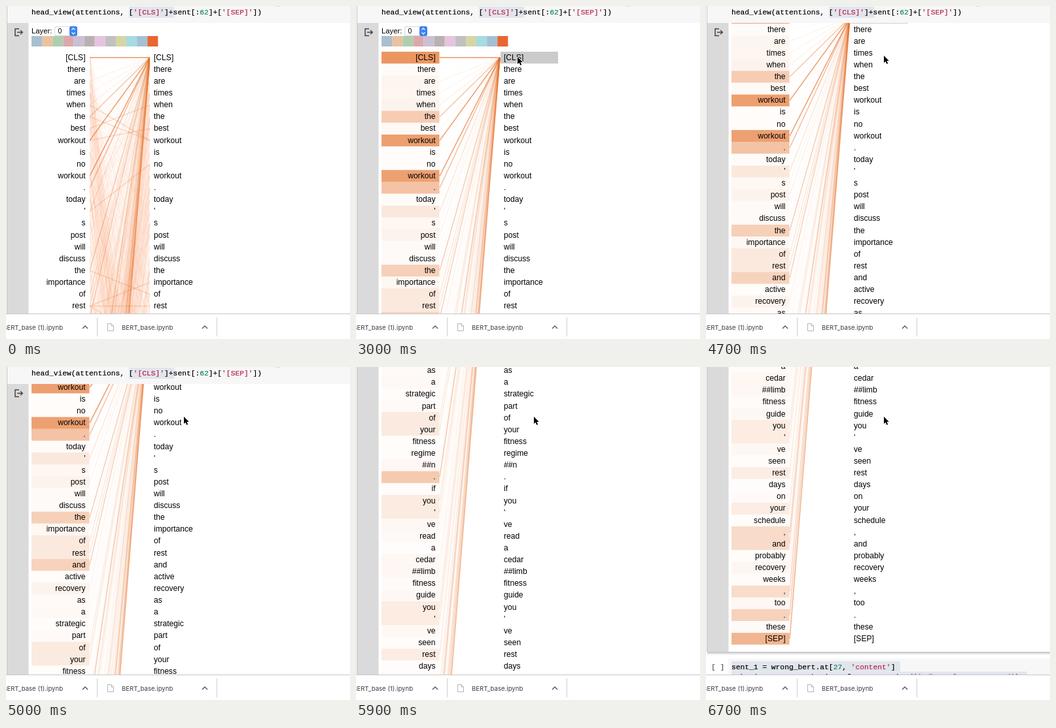
Write an HTML page with a canvas that moves like this. It is 526x510 px and loops after 6800 ms.

```html
<!DOCTYPE html>
<html lang="en">
<head>
<meta charset="utf-8">
<title>Attention head view</title>
<style>
  html, body { margin: 0; width: 100%; height: 100%; overflow: hidden; background: #fff; }
  canvas { display: block; width: 526px; height: 510px; }
</style>
</head>
<body>
<canvas id="stage" width="526" height="510"></canvas>
<script>
const ctx = document.getElementById('stage').getContext('2d');
const LOOP = 6800;
const SANS = '"Liberation Sans", Arial, sans-serif';
const MONO = '11.28px "Liberation Mono", monospace';
const UI = '9.6px Inter, sans-serif';
const CHAR = 6.77;           // width of one code character
const ROW = 18.12, TOP = 70; // token rows
const LEFT = 128, RIGHT = 220;
const PANE_TOP = 26, PANE_BOTTOM = 830, PANE_SCROLL = 411;
const VIEW_BOTTOM = 471;
const RED = '#ba2145', GREEN = '#098658', INK = '#000', ICON = '#444';

const tokens = ("[CLS] there are times when the best workout is no workout . today ' s post will " +
  "discuss the importance of rest and active recovery as a strategic part of your fitness " +
  "regime ##n . if you ' ve read a cedar ##limb fitness guide you ' ve seen rest days on " +
  "your schedule , and probably recovery weeks , too . these [SEP]").split(' ');

const swatches = ['#a9bfcf', '#eac2a0', '#aecfae', '#dba9ab', '#cbbfd5', '#b9b1b1',
  '#e6c3de', '#c1c1c1', '#d5d6a5', '#a5dbe2', '#a5c0d4', '#e8662f'];

// words that attend to [CLS] more than the rest
const salience = { '[CLS]': 0.73, '[SEP]': 0.73, workout: 0.69, '.': 0.44, the: 0.36,
  and: 0.34, ',': 0.34, of: 0.17, your: 0.17, you: 0.17, rest: 0.17, "'": 0.17 };

function noise(i, j) {
  const s = Math.sin(i * 127.1 + j * 311.7) * 43758.5453;
  return s - Math.floor(s);
}

// attention that token i pays to token j
function weight(i, j) {
  const n = noise(i, j);
  if (j === 0) return (salience[tokens[i]] ?? 0.02 + 0.08 * n * n) * (1 - i / 210);
  const neighbours = Math.abs(i - j) < 5;
  return neighbours && n > 0.94 ? 0.22 : 0.042 * n ** 5;
}

const orange = alpha => `rgba(228,112,40,${alpha})`;

function rect(g, x, y, w, h, fill) {
  g.fillStyle = fill;
  g.fillRect(x, y, w, h);
}

function text(str, x, y, font, fill = INK, align = 'left') {
  ctx.font = font;
  ctx.fillStyle = fill;
  ctx.textAlign = align;
  ctx.fillText(str, x, y);
}

function polyline(points, color, width = 1) {
  ctx.beginPath();
  points.forEach(([x, y]) => ctx.lineTo(x, y));
  ctx.strokeStyle = color;
  ctx.lineWidth = width;
  ctx.stroke();
}

function roundBox(x, y, w, h, fill) {
  ctx.beginPath();
  ctx.roundRect(x, y, w, h, 3);
  ctx.fillStyle = fill;
  ctx.fill();
}

function clipTo(x, y, w, h) {
  ctx.save();
  ctx.beginPath();
  ctx.rect(x, y, w, h);
  ctx.clip();
}

// parts alternate between text and colour
function code(x, y, ...parts) {
  for (let k = 0; k < parts.length; k += 2) {
    const [str, color] = parts.slice(k, k + 2);
    text(str, x, y, MONO, color);
    ctx.strokeStyle = color;
    ctx.lineWidth = 0.2;
    ctx.strokeText(str, x, y);
    x += str.length * CHAR;
  }
}

const rowTop = i => TOP + i * ROW;
const rowMiddle = i => rowTop(i + 0.5);

function attentionTo(g, j) {
  g.lineWidth = 1.6;
  tokens.forEach((_, i) => {
    g.strokeStyle = orange(weight(i, j));
    g.beginPath();
    g.moveTo(LEFT, rowMiddle(i));
    g.lineTo(RIGHT, rowMiddle(j));
    g.stroke();
  });
}

// every attention line, drawn once
const web = document.createElement('canvas');
web.width = 526;
web.height = 510;
const webCtx = web.getContext('2d');
rect(webCtx, 0, 0, 526, 510, '#fff');
for (let j = tokens.length - 1; j >= 0; j--) attentionTo(webCtx, j);

// smooth curve through [time, value] points, starting from rest
function curve(points, t) {
  const end = points.length - 1;
  const slope = n => {
    if (n === 0) return 0;
    const [a, b] = [points[n - 1], points[Math.min(n + 1, end)]];
    return (b[1] - a[1]) / (b[0] - a[0]);
  };
  if (t <= points[0][0]) return points[0][1];
  const n = points.findIndex(p => t < p[0]);
  if (n < 0) return points[end][1] + slope(end) * (t - points[end][0]);
  const [t0, v0] = points[n - 1], [t1, v1] = points[n];
  const d = t1 - t0, u = (t - t0) / d;
  return v0 + (v1 - v0) * u * u * (3 - 2 * u) +
    d * u * (1 - u) * (slope(n - 1) * (1 - u) - slope(n) * u);
}

const scrollPoints = [[3850, 0], [4700, 61], [5600, 453], [6300, 613], [6700, 804]];

function ease(t, from, to) {
  const u = Math.min(1, Math.max(0, (t - from) / (to - from)));
  return u * u * (3 - 2 * u);
}

// sweeps in from the right to [CLS], later drifts aside
function cursorAt(t) {
  const remaining = 1 - ease(t, 500, 1100), drift = ease(t, 3300, 3700);
  return { x: 247 + 157 * remaining + 25 * drift, y: 78 + 104 * remaining ** 2 - 2 * drift };
}

function hoveredRow(t) {
  const { x, y } = cursorAt(t);
  return x > 309 ? -1 : Math.max(0, Math.floor((y - TOP) / ROW));
}

function drawControls() {
  text('Layer:', 39, 42, '11.3px ' + SANS);
  roundBox(74, 31, 35, 15, '#d8d8d8');
  roundBox(75, 32, 33, 13, '#fff');
  text('0', 79.5, 42, '10.5px ' + SANS);
  roundBox(97, 31, 12, 15, '#3b83f0');
  polyline([[100.5, 36.7], [103, 34], [105.5, 36.7]], '#fff', 1.2);
  polyline([[100.5, 40.3], [103, 43], [105.5, 40.3]], '#fff', 1.2);
  const w = 193.4 / swatches.length;
  swatches.forEach((color, i) => rect(ctx, 39 + i * w, 46, w, 16, color));
}

function drawTokens(hover) {
  if (hover < 0) {
    const box = [LEFT, TOP, RIGHT - LEFT, 440];
    ctx.drawImage(web, ...box, ...box);
  } else {
    attentionTo(ctx, hover);
    rect(ctx, 221, rowTop(hover), 88, ROW, '#cbcbcb');
    tokens.forEach((_, i) => rect(ctx, 39, rowTop(i), 88.5, ROW, orange(weight(i, hover))));
  }
  const font = '12.1px ' + SANS;
  tokens.forEach((token, i) => {
    const y = rowTop(i) + 12.7;
    text(token, 121.5, y, font, INK, 'right');
    text(token, 226, y, font);
  });
}

function drawCodeCell() {
  rect(ctx, 2, -20, 524, PANE_TOP + 20, '#f7f7f7');
  rect(ctx, 188, 1, 69, 17, '#e1e5ec');
  code(39, 13, 'head_view(attentions, [', INK, "'[CLS]'", RED, ']+sent[:', INK, '62', GREEN,
    ']+[', INK, "'[SEP]'", RED, '])', INK);
  rect(ctx, 412, 0, 7, 1, '#ebdf9f');
}

function drawGutter() {
  rect(ctx, 2, PANE_TOP, 32.5, PANE_BOTTOM - PANE_TOP, '#dadada');
  polyline([[20, 35], [14, 35], [14, 45.5], [20, 45.5]], ICON, 1.5);
  polyline([[17, 40.3], [25, 40.3]], ICON, 1.5);
  polyline([[22, 37.3], [25.3, 40.3], [22, 43.3]], ICON, 1.5);
}

function drawNextCell() {
  const shadow = ctx.createLinearGradient(0, PANE_BOTTOM, 0, PANE_BOTTOM + 5);
  shadow.addColorStop(0, '#a9a9a9');
  shadow.addColorStop(0.35, '#dedede');
  shadow.addColorStop(1, '#fff');
  rect(ctx, 2, PANE_BOTTOM, 524, 5, shadow);
  rect(ctx, 34, 840, 492, 60, '#f7f7f7');
  rect(ctx, 39, 844, 258, 16, '#e1e5ec');
  rect(ctx, 39, 860, 452, 16, '#e1e5ec');
  code(8, 856, '[ ]', '#555');
  code(39, 856, 'sent_1 = wrong_bert.at[', INK, '27', GREEN, ', ', INK, "'content'", RED, ']', INK);
  code(39, 871.5, 'tokenizer = BertTokenizer.from_pretrained(', INK, "'./bert-large-uncased'", RED, ')', INK);
}

function drawDownloads() {
  rect(ctx, 0, VIEW_BOTTOM, 526, 39, '#fff');
  rect(ctx, 0, VIEW_BOTTOM, 526, 1, '#c6c6c6');
  text('BERT_base (1).ipynb', 87, 496, UI, '#3c3c3c', 'right');
  text('BERT_base.ipynb', 177, 496, UI, '#3c3c3c');
  for (const x of [121, 304]) {
    polyline([[x - 4, 494], [x, 490], [x + 4, 494]], '#555', 1.4);
    rect(ctx, x + 18, 477, 1, 29, '#cfcfcf');
  }
  polyline([[155.5, 486.5], [161, 486.5], [164.5, 490], [164.5, 497.5], [155.5, 497.5], [155.5, 486]], '#b4b4b4');
  polyline([[161, 486.5], [161, 490], [164.5, 490]], '#b4b4b4');
}

function drawCursor({ x, y }) {
  const outline = [[0, 0], [0, 11], [2.5, 8.7], [4.3, 12.8], [6.2, 12], [4.4, 8], [7.8, 8], [0, 0]];
  polyline(outline.map(([dx, dy]) => [x + dx, y + dy]), '#fff', 1.8);
  ctx.fillStyle = INK;
  ctx.fill();
}

function draw(t) {
  const scroll = curve(scrollPoints, t);
  const inner = Math.min(scroll, PANE_SCROLL); // the output pane scrolls first, then the page

  rect(ctx, 0, 0, 526, 510, '#fff');
  clipTo(0, 0, 526, VIEW_BOTTOM);
  ctx.translate(0, inner - scroll);
  drawCodeCell();
  drawGutter();
  drawNextCell();
  rect(ctx, 1, -20, 1, PANE_BOTTOM + 20, '#c4c4c4');

  clipTo(34.5, PANE_TOP, 492, PANE_BOTTOM - PANE_TOP);
  ctx.translate(0, -inner);
  drawControls();
  drawTokens(hoveredRow(t));
  ctx.restore();
  ctx.restore();

  drawDownloads();
  if (t >= 500) drawCursor(cursorAt(t));
}

function frame() {
  draw(performance.now() % LOOP);
  requestAnimationFrame(frame);
}
frame();
</script>
</body>
</html>
```
